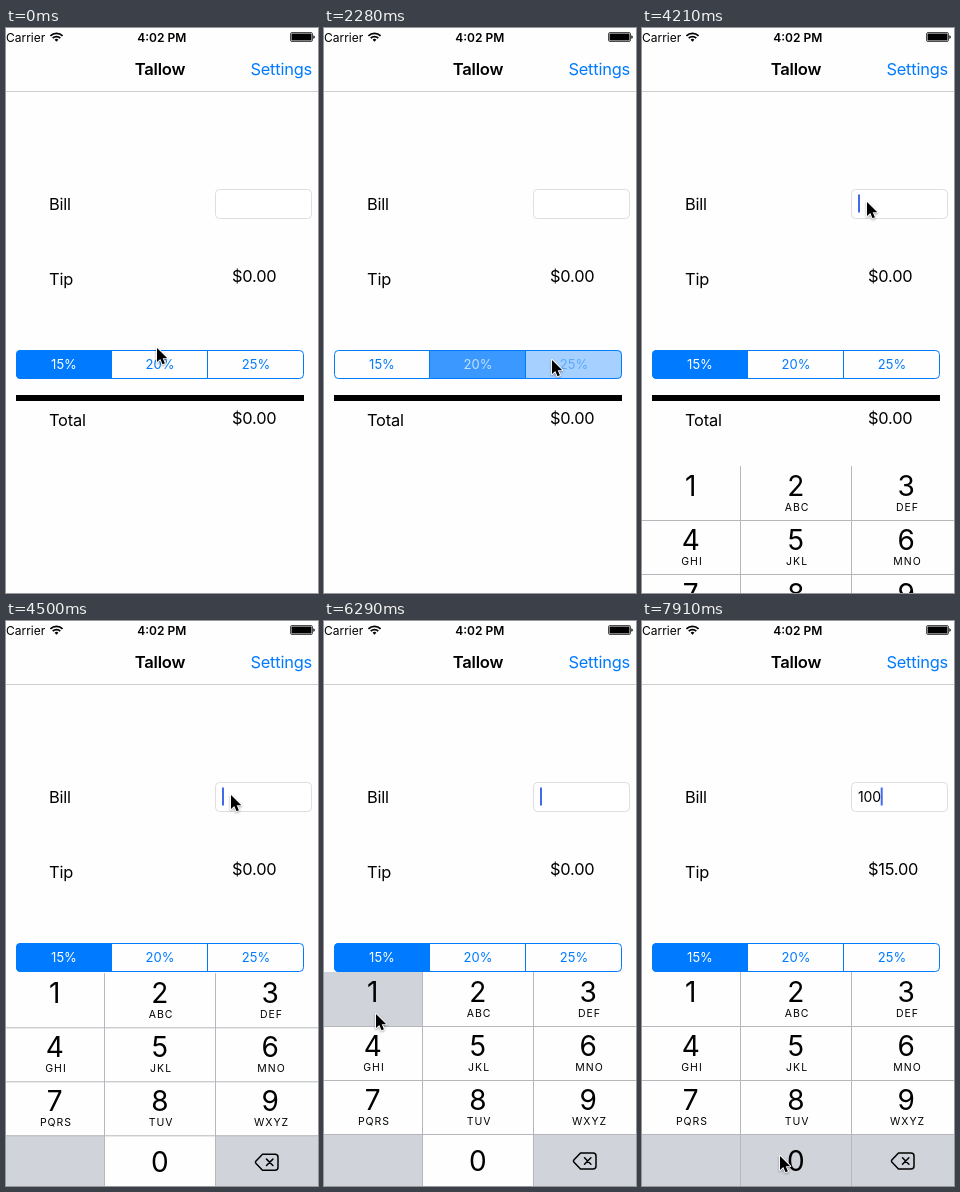
These frames come from a looping animation (312x565 px, 8000 ms). An HTML page:

```html
<!DOCTYPE html>
<html lang="en">
<head>
<meta charset="utf-8">
<title>Tip calculator</title>
<style>
  html, body { margin: 0; width: 100%; height: 100%; overflow: hidden; background: #fefefe; }
  svg { display: block; width: 312px; height: 565px; }
  text { font-family: Inter, Roboto, "Liberation Sans", sans-serif; }

  .body { font-size: 16.4px; letter-spacing: -.2px; }
  .status { font-size: 12px; }
  .title { font-size: 16.6px; letter-spacing: -.2px; }
  .bold { font-weight: 600; }
  .mid { text-anchor: middle; }
  .end { text-anchor: end; }
  .bill { font-size: 14px; letter-spacing: -.2px; }
  .digit { font-size: 28px; }
  .letters { font-size: 10.5px; letter-spacing: 1px; }
  .blue { fill: #007aff; }
  .caret { fill: #426bea; }
  .grey { fill: #d0d3da; }

  .anim, .seg { animation: 8s step-end infinite; }

  /* --a: how far a segment is filled */
  .seg rect { fill: #007aff; fill-opacity: var(--a); }
  .seg text { font-size: 13px; fill: color-mix(in srgb, #fff calc(var(--a) * 100%), #007aff); }
  .seg1 { animation-name: seg1; }
  .seg2 { animation-name: seg2; }
  .seg3 { animation-name: seg3; }
  @keyframes seg1 {
    0% { --a: 1 } 17.375% { --a: .42 } 19.25% { --a: 0 }
    37.75% { --a: .15 } 39.625% { --a: .96 } 41.5%, 100% { --a: 1 }
  }
  @keyframes seg2 {
    0% { --a: 0 } 15.5% { --a: .15 } 17.375% { --a: .62 } 19.25% { --a: 1 }
    28.5% { --a: .77 } 30.375%, 100% { --a: 0 }
  }
  @keyframes seg3 {
    0% { --a: 0 } 26.625% { --a: .15 } 28.5% { --a: .35 } 30.375% { --a: 1 }
    39.625% { --a: .05 } 41.5%, 100% { --a: 0 }
  }

  .keypad { animation-name: slide; }
  @keyframes slide {
    0% { transform: translateY(214px) }
    52.625% { transform: translateY(87px) }
    54.5% { transform: translateY(10.6px) }
    56.25% { transform: translateY(1.3px) }
    58.125%, 100% { transform: none }
  }

  .press1 { animation-name: press1; }
  .press0 { animation-name: press0; }
  @keyframes press1 {
    0% { opacity: 0 } 78.625% { opacity: 1 } 82.375%, 100% { opacity: 0 }
  }
  @keyframes press0 {
    0% { opacity: 0 } 89.625% { opacity: 1 } 93.375% { opacity: 0 } 97.125%, 100% { opacity: 1 }
  }

  .blink { animation-name: blink; }
  @keyframes blink {
    0% { opacity: 0 } 52.625% { opacity: 1 } 63.75% { opacity: 0 } 69.375% { opacity: 1 }
    74.875% { opacity: 0 } 78.625%, 100% { opacity: 1 }
  }

  .entry0 { animation-name: entry0; }
  .entry1 { animation-name: entry1; }
  .entry2 { animation-name: entry2; }
  .entry3 { animation-name: entry3; }
  @keyframes entry0 { 0% { opacity: 1 } 80.5%, 100% { opacity: 0 } }
  @keyframes entry1 { 0% { opacity: 0 } 80.5% { opacity: 1 } 91.5%, 100% { opacity: 0 } }
  @keyframes entry2 { 0% { opacity: 0 } 91.5% { opacity: 1 } 98.875%, 100% { opacity: 0 } }
  @keyframes entry3 { 0% { opacity: 0 } 98.875%, 100% { opacity: 1 } }

  .cursor {
    animation-name: move;
    stroke: #fff; stroke-width: 1.8; stroke-linejoin: round; paint-order: stroke;
    filter: drop-shadow(0 1px 1px #0005);
  }
  @keyframes move {
    0% { transform: translate(151px, 320px) }
    6.25% { transform: translate(146px, 323px) }
    8.06% { transform: translate(133px, 328px) }
    9.875% { transform: translate(128px, 330px) }
    23% { transform: translate(150px, 331px) }
    24.875% { transform: translate(212px, 332px) }
    26.625% { transform: translate(228px, 332px) }
    32.25% { transform: translate(140px, 332px) }
    34.125% { transform: translate(72px, 332px) }
    43.375% { transform: translate(110px, 293px) }
    45.25% { transform: translate(192px, 206px) }
    47.125% { transform: translate(225px, 174px) }
    63.75% { transform: translate(205px, 203px) }
    65.625% { transform: translate(142px, 300px) }
    67.5% { transform: translate(72px, 412px) }
    69.375% { transform: translate(37px, 454px) }
    71.25% { transform: translate(41px, 430px) }
    74.875% { transform: translate(47px, 408px) }
    76.75% { transform: translate(52px, 393px) }
    84.125% { transform: translate(70px, 425px) }
    86% { transform: translate(119px, 508px) }
    87.75%, 100% { transform: translate(138px, 535px) }
  }
</style>
</head>
<body>
<svg viewBox="0 0 312 565">
  <defs>
    <clipPath id="pill"><rect x="10" y="322" width="288" height="29" rx="4.5"/></clipPath>
  </defs>

  <!-- status bar -->
  <text class="status" x="0" y="13.7">Carrier</text>
  <g fill="none" stroke="#000" stroke-width="1.7">
    <path d="M44.4 7.9a8.6 8.6 0 0 1 12.2 0M46.7 10.2a5.4 5.4 0 0 1 7.6 0"/>
  </g>
  <path d="M48.6 11.7a2.7 2.7 0 0 1 3.8 0L50.5 13.7z"/>
  <text class="status bold mid" x="155.7" y="13.7">4:02 PM</text>
  <rect x="284.5" y="4.5" width="22" height="9" rx="1.5" fill="none" stroke="#000" stroke-width=".7"/>
  <rect x="285.5" y="5.5" width="20" height="7" rx=".6"/>
  <path d="M307.3 7.2q1.5 .4 1.5 1.8t-1.5 1.8z"/>

  <!-- navigation bar -->
  <text class="title bold mid" x="154" y="47">Tallow</text>
  <text class="body blue end" x="306" y="47">Settings</text>
  <rect y="63" width="312" height="1" fill="#cfcfcf"/>

  <!-- form -->
  <g class="body">
    <text x="43" y="181.7">Bill</text>
    <text x="43" y="256.8">Tip</text>
    <text x="43" y="397.8">Total</text>
    <text x="226" y="396.2">$0.00</text>
  </g>
  <rect x="209.5" y="161.5" width="96" height="29" rx="4" fill="#fff" stroke="#dedede"/>
  <rect x="10" y="367" width="288" height="6"/>

  <g class="anim entry0">
    <rect class="caret anim blink" x="216" y="166.5" width="2" height="18"/>
    <text class="body" x="226" y="254.2">$0.00</text>
  </g>
  <g class="anim entry1">
    <text class="bill" x="216" y="180.9">1</text>
    <rect class="caret" x="222" y="166.5" width="2" height="18"/>
    <text class="body" x="226" y="254.2">$0.15</text>
  </g>
  <g class="anim entry2">
    <text class="bill" x="216" y="180.9">10</text>
    <rect class="caret" x="230.3" y="166.5" width="2" height="18"/>
    <text class="body" x="226" y="254.2">$1.50</text>
  </g>
  <g class="anim entry3">
    <text class="bill" x="216" y="180.9">100</text>
    <rect class="caret" x="238.7" y="166.5" width="2" height="18"/>
    <text class="body" x="226" y="254.2">$15.00</text>
  </g>

  <!-- tip rate -->
  <g clip-path="url(#pill)">
    <g class="seg seg1"><rect x="10" y="322" width="96" height="29"/><text class="mid" x="58" y="341.4">15%</text></g>
    <g class="seg seg2"><rect x="106" y="322" width="96" height="29"/><text class="mid" x="154" y="341.4">20%</text></g>
    <g class="seg seg3"><rect x="202" y="322" width="96" height="29"/><text class="mid" x="250" y="341.4">25%</text></g>
  </g>
  <g fill="none" stroke="#007aff">
    <rect x="10.5" y="322.5" width="287" height="28" rx="4"/>
    <path d="M105.5 322v29M201.5 322v29"/>
  </g>

  <!-- keypad -->
  <g class="anim keypad">
    <rect y="351" width="312" height="216" fill="#fefefe"/>
    <rect class="grey" y="513" width="98" height="54"/>
    <rect class="grey" x="210" y="513" width="102" height="54"/>
    <rect class="grey anim press1" y="351" width="98" height="54"/>
    <rect class="grey anim press0" x="99" y="513" width="110" height="54"/>
    <path d="M0 405.5H312M0 459.5H312M0 513.5H312M98.5 351V567M209.5 351V567" stroke="#b6b7bb"/>
    <g id="keys"></g>
    <g fill="none" stroke="#000" stroke-width="1.5" stroke-linejoin="round" stroke-linecap="round">
      <path d="M256.5 532h12.5a3 3 0 0 1 3 3v10a3 3 0 0 1-3 3h-12.5l-6.7-7q-.8-1 0-2z"/>
      <path d="M260.5 536.8l6.4 6.4M266.9 536.8l-6.4 6.4"/>
    </g>
  </g>

  <path class="anim cursor" d="M0 0v14l3.3-3 2.2 5.2 2.4-1-2.2-5h4.6z"/>
</svg>
<script>
  const keys = document.getElementById('keys');
  const columns = [48.7, 153.8, 264.2];
  const letters = ['', 'ABC', 'DEF', 'GHI', 'JKL', 'MNO', 'PQRS', 'TUV', 'WXYZ'];

  function label(kind, x, y, value) {
    const el = document.createElementNS('http://www.w3.org/2000/svg', 'text');
    el.setAttribute('class', kind + ' mid');
    el.setAttribute('x', x);
    el.setAttribute('y', y);
    el.textContent = value;
    keys.append(el);
  }

  letters.forEach((group, i) => {
    const x = columns[i % 3], top = 351 + 54 * Math.floor(i / 3);
    label('digit', x, top + 30.2, i + 1);
    if (group) label('letters', x + 1.3, top + 45.2, group);
  });
  label('digit', columns[1], 550.2, 0);
</script>
</body>
</html>
```
